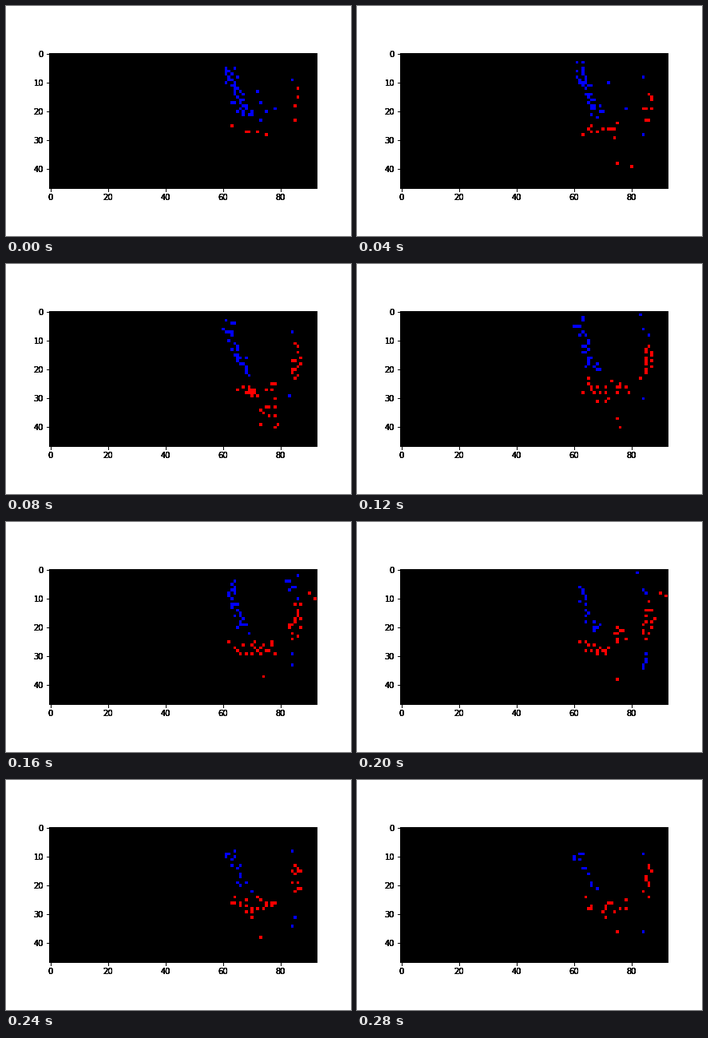
Animation, 432 px wide and 288 px high, one loop 0.32 s. Source, as a matplotlib script:

```python
import matplotlib.pyplot as plt
import numpy as np
from matplotlib.animation import FuncAnimation

COLS, ROWS = 93, 47
FRAMES, STEP_MS = 8, 40
RED, BLUE = (255, 0, 0), (0, 0, 255)


def bump(i, peak, width):
    return np.exp(-((i - peak) / width) ** 2)


def ramp(i, *points):
    return np.interp(i, *zip(*points))


def events(i):
    """Events fired along the moving edges during one time step."""
    rng = np.random.default_rng(40 + i)
    grid = np.zeros((ROWS, COLS, 3), np.uint8)

    def edge(color, n, path, sx=1.3, sy=0.7):
        """Scatter n cells along a path of key points."""
        n = round(float(n))
        s = np.linspace(0, len(path) - 1, n)
        x, y = (np.interp(s, range(len(path)), axis) for axis in zip(*path))
        x = np.rint(x + rng.normal(0, sx, n)).clip(58, COLS - 1).astype(int)
        y = np.rint(y + rng.normal(0, sy, n)).clip(1, ROWS - 1).astype(int)
        grid[y, x] = color

    # Long slope on the left, thinning out
    top = 5 - 2.5 * bump(i, 2.5, 1.5) + 4 * bump(i, 6.5, 1.5)
    edge(BLUE, ramp(i, (0, 46), (2, 30), (4, 26), (7, 11)),
         [(62.5, top), (63, 10), (65.5, 16), (68, 21)])
    edge(BLUE, 5 * bump(i, 0, 1), [(72, 11), (73, 21), (78, 19)], 0.5)

    # Floor, whose right end swings up towards the rim
    left = 63 + 4 * bump(i, 2, 0.8)
    right = 78 - 4 * bump(i, 0, 1)
    lift = 6 * bump(i, 5, 0.8)
    edge(RED, ramp(i, (0, 5), (2, 18), (5, 24), (7, 17)),
         [(left, 26.5), (70, 28), (right, 27 - lift)], 1, 1.5)

    # Burst falling below the floor
    edge(RED, min(i, 1) + 11 * bump(i, 2, 0.6), [(75, 38), (76, 32), (80, 39)], 1.8, 1.5)

    # Rim on the right and its far corner
    edge(RED, ramp(i, (0, 4), (2, 14), (5, 15), (7, 9)), [(86.3, 12.5), (85, 23)], 1, 1)
    edge(RED, 3 * bump(i, 4.5, 0.8), [(90, 8), (92, 10)], 0.3)

    # Spark bobbing above the rim, with a burst around it
    bob = 7.5 + 1.6 * np.cos(2 * np.pi * i / 7)
    edge(BLUE, 1, [(84, bob)], 0, 0)
    edge(BLUE, 6 * bump(i, 4, 0.9), [(83, 1), (84, 8)], 1, 1)

    # Spark sinking below the rim
    edge(BLUE, min(i / 2, 1) + 5 * bump(i, 5, 0.8), [(83, 28 + i), (85, 30)], 1, 1)
    return grid


plt.rcParams.update({"font.family": "DejaVu Sans", "font.size": 10})
fig = plt.figure(figsize=(6, 4), dpi=72, facecolor="white")
grids = [events(i) for i in range(FRAMES)]

# Stacked axes make the labels heavier
images = []
for _ in range(8):
    ax = fig.add_axes([0.125, 0.125, 0.775, 0.755])
    images.append(ax.imshow(grids[0], interpolation="nearest"))
    ax.set_xticks(range(0, 81, 20))
    ax.set_yticks(range(0, 41, 10))


def update(i):
    for image in images:
        image.set_data(grids[i])
    return images


anim = FuncAnimation(fig, update, frames=FRAMES, interval=STEP_MS,
                     repeat=True, repeat_delay=0, blit=False)
plt.show()
```
